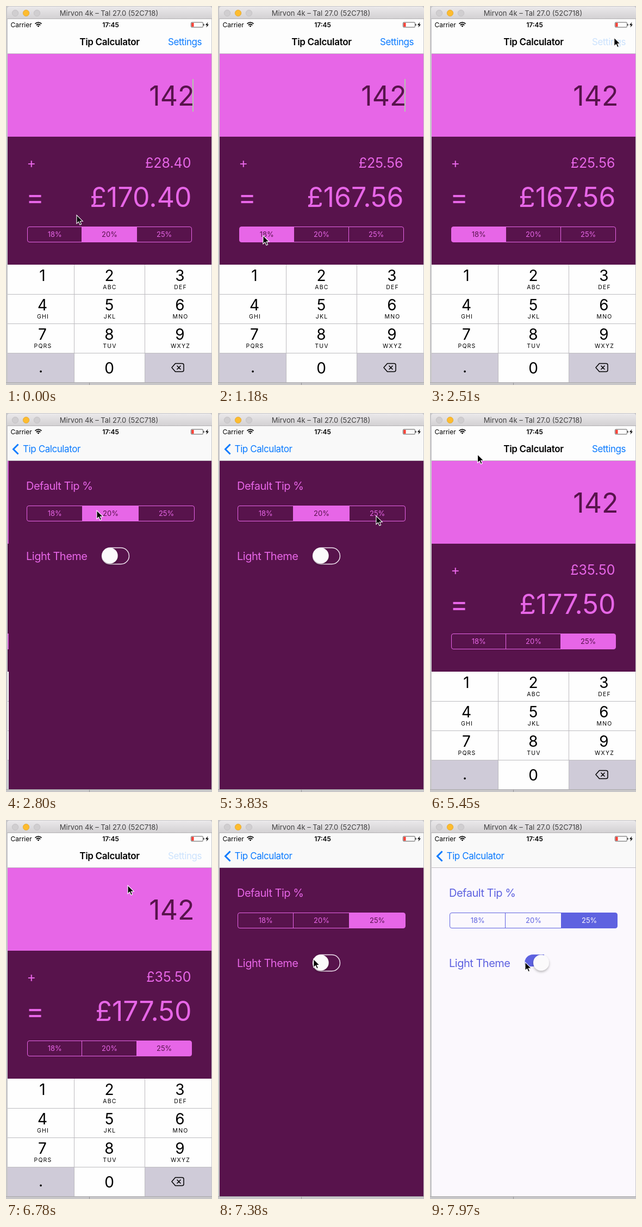
An HTML page that plays this animation: 379x696 px, repeating every 8 s.

```html
<!DOCTYPE html>
<html lang="en">
<head>
<meta charset="utf-8">
<title>Tip Calculator</title>
<style>
  html, body { margin: 0; width: 100%; height: 100%; overflow: hidden; background: #c8c7c9; }
  svg { display: block; width: 379px; height: 696px; font-family: Inter, "Open Sans", sans-serif; --ink: #e766e7; --paper: #58134c; }
  .ink { fill: var(--ink); }
  .paper { fill: var(--paper); }
  .line { fill: none; stroke: var(--ink); }
  .mid { text-anchor: middle; }
  .end { text-anchor: end; }
  .big { font-size: 50px; }
  .small { font-size: 25px; }
  .nav { font-size: 17px; letter-spacing: -.025em; }
  #title { letter-spacing: -.018em; }
  .label { font-size: 20px; letter-spacing: -.5px; }
  .seg text { font-size: 13px; text-anchor: middle; fill: var(--ink); }
  .seg text.on { fill: var(--paper); }
  .digit { font-size: 28px; text-anchor: middle; }
  .abc { font-size: 10.5px; letter-spacing: 1.2px; text-anchor: middle; }
  .light { --ink: #5e62e0; --paper: #fbf8fd; }
</style>
</head>
<body>
<svg viewBox="0 0 379 696">
  <defs>
    <clipPath id="screen"><rect x="3" y="24" width="375" height="667"/></clipPath>
    <clipPath id="fillClip"><rect x="174" y="247" width="36" height="22"/></clipPath>
    <linearGradient id="bar" x2="0" y2="1"><stop stop-color="#ebe9eb"/><stop offset="1" stop-color="#d2d0d2"/></linearGradient>
    <linearGradient id="edge"><stop stop-opacity="0"/><stop offset="1" stop-opacity=".2"/></linearGradient>
    <filter id="soft" x="-50%" y="-50%" width="200%" height="200%">
      <feDropShadow dx="0" dy="2.5" stdDeviation="2" flood-opacity=".28"/>
    </filter>
  </defs>

  <rect width="379" height="696" fill="#c8c7c9"/>
  <path d="M0 691.5H379" stroke="#a9a8aa"/>
  <path d="M153.5 692V696" stroke="#969597"/>
  <path d="M2 24V6Q2 1 7 1H374Q379 1 379 6V24Z" fill="url(#bar)"/>
  <path d="M2 23.5H379" stroke="#b4b2b4"/>
  <g fill="#d0ced0" stroke="#bdbbbd" stroke-width=".7">
    <circle cx="17" cy="13" r="5.7"/>
    <circle cx="37" cy="13" r="5.7" fill="#fdbc2f" stroke="#dfa023"/>
    <circle cx="57" cy="13" r="5.7"/>
  </g>
  <text class="mid" x="189.5" y="18" font-size="13" fill="#414041">Mirvon 4k – Tal 27.0 (52C718)</text>

  <g clip-path="url(#screen)">
    <g id="main">
      <rect class="ink" x="3" y="88" width="375" height="152"/>
      <rect class="paper" x="3" y="240" width="375" height="240"/>
      <text class="big end paper" x="346.5" y="183">142</text>
      <rect id="caret" x="343" y="134" width="2" height="60" fill="#b3c6ac"/>
      <text class="small ink" x="38.5" y="296.5">+</text>
      <text class="small ink end" id="tip" x="340.5" y="297"></text>
      <text class="big ink" x="37" y="368.5">=</text>
      <text class="big ink end" id="total" x="341.5" y="369"></text>
      <g class="seg" id="mainSeg"></g>
      <rect id="dim" x="3" y="88" width="375" height="387"/>
      <g id="keys"></g>
    </g>

    <g id="panel">
      <rect id="shade" x="-6" y="88" width="9" height="603" fill="url(#edge)"/>
      <rect class="paper" x="3" y="88" width="375" height="603"/>
      <text class="label ink" x="35" y="141">Default Tip %</text>
      <g class="seg" id="panelSeg"></g>
      <text class="label ink" x="35" y="270">Light Theme</text>
      <rect id="track" x="174.5" y="247.5" width="50" height="30" rx="15" fill="none" stroke="#f3e8f3" stroke-width="1.4"/>
      <rect class="ink" id="fill" x="174" y="247" width="51" height="31" rx="15.5" clip-path="url(#fillClip)"/>
      <rect id="thumb" y="247.5" height="29" rx="14.5" fill="#fbfafb" filter="url(#soft)"/>
    </g>

    <rect id="navBar" x="3" y="24" width="375" height="64"/>
    <path d="M3 87.5H378" stroke="#c0bcc1"/>
    <path id="chevron" d="M22.5 57.5L13.5 66.5 22.5 75.5" fill="none" stroke="#0a7aff" stroke-width="3"/>
    <text class="nav mid" id="back" y="72" fill="#0a7aff">Tip Calculator</text>
    <text class="nav mid" id="title" y="72" font-weight="600">Tip Calculator</text>
    <text class="nav" id="settings" x="298" y="72" fill="#0a7aff">Settings</text>

    <text x="8.5" y="38.5" font-size="12">Carrier</text>
    <g fill="none" stroke="#000" stroke-width="1.8">
      <path d="M53.5 32.6Q59.5 27.6 65.5 32.6M55.7 35.1Q59.5 32 63.3 35.1"/>
      <path d="M57.5 36.4Q59.5 35 61.5 36.4L59.5 38.8Z" fill="#000" stroke="none"/>
    </g>
    <text class="mid" x="192.5" y="38.5" font-size="12" font-weight="600">17:45</text>
    <rect x="340.5" y="30" width="22" height="9" rx="1.5" fill="none" stroke="#333" stroke-width=".8"/>
    <rect x="341.5" y="31" width="4" height="7" fill="#ff3b30"/>
    <path d="M364 33V36" stroke="#333" stroke-width="1.4"/>
    <path d="M371.5 29.5L367 35H369.7L368.5 39.5 373 33.7H370.2Z"/>
  </g>

  <path id="cursor" d="M0 0V15.5L3.6 12.2 6 17.7 8.6 16.6 6.3 11.2H11.2Z" stroke="#fff" stroke-width="1.1"/>
</svg>

<script>
const $ = id => document.getElementById(id);
const set = (id, attrs) => { for (const k in attrs) $(id).setAttribute(k, attrs[k]); };
const lerp = (a, b, p) => a + (b - a) * p;

const LOOP = 8000, STEP = 147.4;
const RATES = [18, 20, 25], BILL = 142;
const PUSH = 2506, POP = 4649.6, PUSH_AGAIN = 6781;

// Pointer stops: time, x, y
const STOPS = [
  [0, 130, 384], [140, 97, 416], [300, 97, 416], [440, 84, 424], [900, 82, 423], [1480, 84, 420],
  [2210, 325, 68], [2500, 339, 58], [2800, 167, 179], [3090, 172, 184], [3390, 172, 184],
  [3830, 291, 189], [4130, 291, 187], [4560, 87.5, 76], [5800, 87.5, 76], [6480, 322, 62],
  [6640, 320, 64], [6780, 224, 120], [7080, 178, 240], [7520, 175, 261], [8000, 175, 261]
];

function buildSegments(id, x, y, w) {
  const cell = w / 3;
  const edge = i => x + Math.floor(cell * i);
  const cells = RATES.map((r, i) =>
    `<text x="${x + cell * (i + .5)}" y="${y + 18.7}">${r}%</text>`).join("");
  $(id).innerHTML = `<clipPath id="${id}Clip"><rect x="${x}" y="${y}" width="${w}" height="28" rx="3.5"/></clipPath>
    <g clip-path="url(#${id}Clip)"><rect class="ink pick" y="${y}" height="28"/></g>
    <rect class="line" x="${x}" y="${y}" width="${w}" height="28" rx="3.5"/>
    <path class="line" d="M${edge(1)} ${y}v28M${edge(2)} ${y}v28"/>${cells}`;
  return choice => {
    const pick = $(id).querySelector(".pick");
    pick.setAttribute("x", edge(choice));
    pick.setAttribute("width", edge(choice + 1) - edge(choice));
    $(id).querySelectorAll("text").forEach((t, i) => t.classList.toggle("on", i === choice));
  };
}

function buildKeys() {
  const letters = ["", "ABC", "DEF", "GHI", "JKL", "MNO", "PQRS", "TUV", "WXYZ"];
  const columns = [67, 190, 320];
  const keys = letters.map((abc, i) => {
    const x = columns[i % 3], y = 505 + 54 * Math.floor(i / 3);
    return `<text class="digit" x="${x}" y="${y}">${i + 1}</text><text class="abc" x="${x + 1}" y="${y + 15}">${abc}</text>`;
  }).join("");
  $("keys").innerHTML = `<rect x="3" y="475" width="375" height="216" fill="#fefefe"/>
    <g id="sideKeys"><path d="M3 638H125V691H3ZM256 638H378V691H256Z"/></g>
    <path d="M3 529.5H378M3 583.5H378M3 637.5H378M125.5 475V691M255.5 475V691" stroke="#bdbcc0"/>
    ${keys}<text class="digit" x="190" y="674.5">0</text><text class="digit" x="64" y="673">.</text>
    <path d="M311.5 656.5H324Q327 656.5 327 659.5V668.5Q327 671.5 324 671.5H311.5L305 664Z
      M314.5 660.5L321.5 667.5M321.5 660.5L314.5 667.5" fill="none" stroke="#000" stroke-width="1.5" stroke-linejoin="round"/>`;
}

const pickMain = buildSegments("mainSeg", 39.5, 405.5, 302);
const pickPanel = buildSegments("panelSeg", 36.5, 170.5, 308);
buildKeys();

// Critically damped spring, 0 to 1
function spring(ms) {
  const x = Math.max(0, ms) * .025;
  return 1 - (1 + x) * Math.exp(-x);
}

function pushed(t) {
  if (t < POP) return spring(t - PUSH);
  return t < PUSH_AGAIN ? 1 - spring(t - POP) : spring(t - PUSH_AGAIN);
}

function pointer(t) {
  const i = STOPS.findIndex(s => s[0] > t);
  const [t0, x0, y0] = STOPS[i - 1], [t1, x1, y1] = STOPS[i];
  const u = (t - t0) / (t1 - t0), p = u * u * (3 - 2 * u);
  return [lerp(x0, x1, p), lerp(y0, y1, p)];
}

function caretOn(t) {
  if (t < PUSH - 5) return t % 1050 < 600 && t < 2350;
  return t > POP + 150 && t < PUSH_AGAIN - 150 && (t - 4850) % 1030 < 590;
}

function draw(now) {
  const t = Math.floor((now % LOOP + 8) / STEP) * STEP;
  const p = pushed(t);
  const between = (a, b) => t >= a && t < b;

  const choice = t < 580 ? 1 : t < POP ? 0 : 2;
  const tip = BILL * RATES[choice] / 100;
  pickMain(choice);
  pickPanel(t < 3970 ? 1 : 2);
  $("tip").textContent = "£" + tip.toFixed(2);
  $("total").textContent = "£" + (BILL + tip).toFixed(2);
  set("caret", { opacity: +caretOn(t) });

  set("main", { transform: `translate(${-112.5 * p} 0)` });
  set("panel", { transform: `translate(${375 * (1 - p)} 0)` });
  set("dim", { opacity: .1 * p });
  set("shade", { opacity: Math.min(1, 4 * p * (1 - p)) });
  set("sideKeys", { fill: p > .02 ? "#d0d4d9" : "#cfcbd8" });

  const pressed = between(2350, PUSH) || between(6620, PUSH_AGAIN);
  const backPressed = between(4550, POP);
  const x = lerp(190.5, 83.5, p);
  set("title", { x, opacity: (1 - p) ** 1.5 });
  set("back", { x: x - 14 * p * (1 - p), opacity: backPressed ? .2 : p ** 1.4 });
  set("chevron", { opacity: backPressed ? .2 : p ** 3 });
  set("settings", { opacity: pressed ? .2 : (1 - p) ** 4 });
  set("navBar", { fill: p > .4 ? "#f9f9f9" : "#fdfdfd" });

  const light = t > 7950, held = t > 7800 && !light;
  $("panel").classList.toggle("light", light);
  set("track", { opacity: light ? 0 : 1 });
  set("fill", { opacity: light ? 1 : 0 });
  set("thumb", { x: light ? 190 : 174.7, width: held ? 35 : 29 });

  set("cursor", { transform: `translate(${pointer(t)})` });
}

const start = performance.now();
function tick() {
  draw(performance.now() - start);
  requestAnimationFrame(tick);
}
tick();
</script>
</body>
</html>
```
